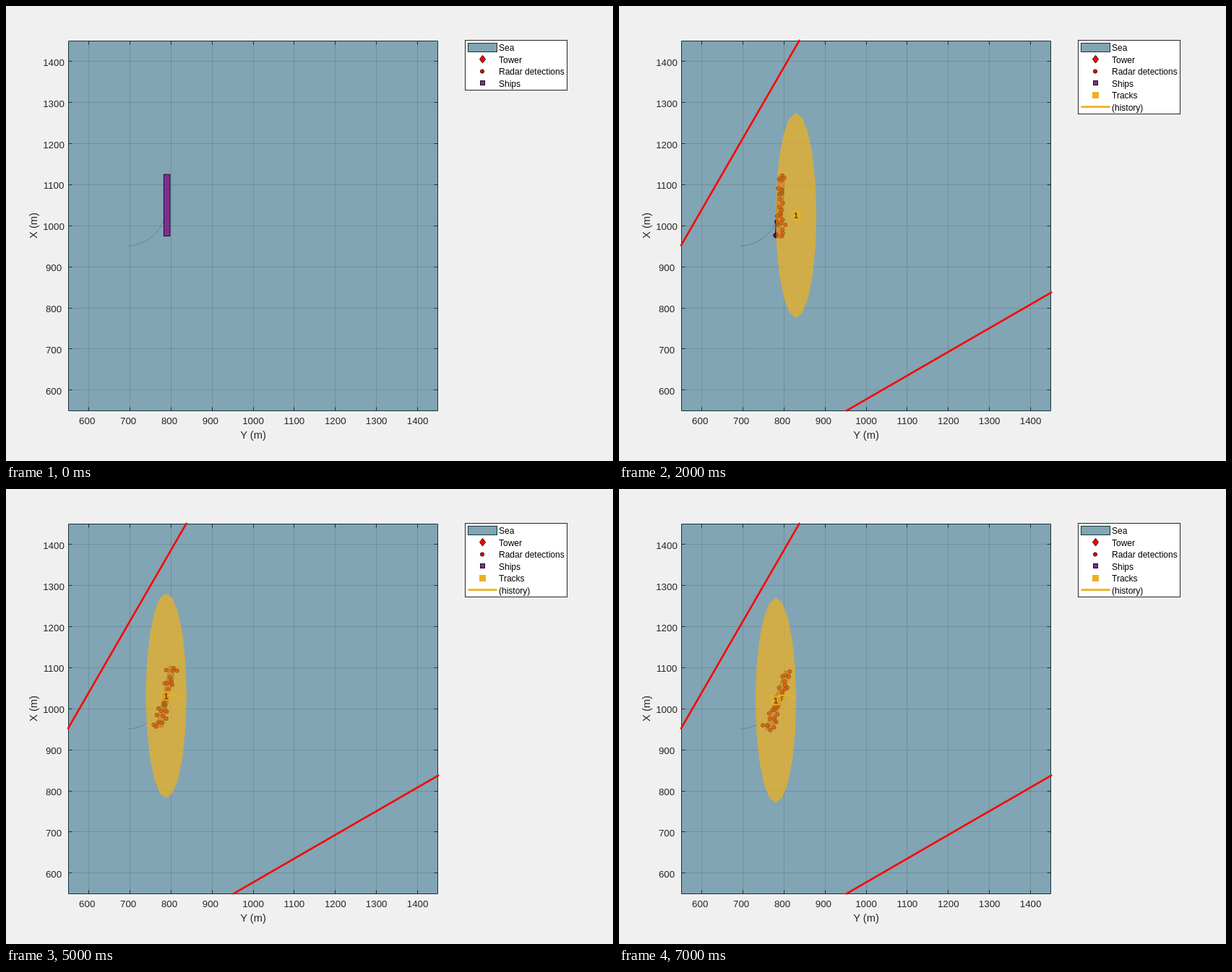
Recreate the animation shown at these times as an HTML page. Size 840 by 630 pixels, loop 8 s.

```html
<!DOCTYPE html>
<html lang="en">
<head>
<meta charset="utf-8">
<title>Radar tracking</title>
<style>
  html, body { margin: 0; width: 100%; height: 100%; overflow: hidden; background: #f0f0f0; }
  svg { display: block; width: 840px; height: 630px; font-family: "Liberation Sans", Arial, sans-serif; }
</style>
</head>
<body>
<svg id="stage" viewBox="0 0 840 630"></svg>
<script>
const NS = "http://www.w3.org/2000/svg";
const stage = document.getElementById("stage");
const SEA = "#81a5b4", INK = "#262626", GOLD = "#edb120", PURPLE = "#7e2f8e", RED = "#f00000";

function add(parent, tag, attrs, text) {
  const el = document.createElementNS(NS, tag);
  for (const k in attrs) el.setAttribute(k, attrs[k]);
  if (text !== undefined) el.textContent = text;
  parent.appendChild(el);
  return el;
}
const path = (parent, d, attrs) => add(parent, "path", { d, fill: "none", ...attrs });
const label = (parent, x, y, size, text, attrs) =>
  add(parent, "text", { x, y, "font-size": size, fill: INK, "text-anchor": "middle", ...attrs }, text);

// Axes: 550 to 1450 m across 512 px
const L = 86.5, T = 48.5, R = 597.5, B = 560.5;
const toX = m => 86 + (m - 550) * 512 / 900;
const toY = m => 560.3 - (m - 550) * 512 / 900;

add(stage, "rect", { width: 840, height: 630, fill: "#f0f0f0" });
add(stage, "rect", { x: L, y: T, width: R - L, height: B - T, fill: SEA });

let grid = "", ticks = "";
for (let m = 600; m <= 1400; m += 100) {
  const x = Math.floor(toX(m)) + 0.5, y = Math.floor(toY(m)) + 0.5;
  grid += `M${x} ${T}V${B}M${L} ${y}H${R}`;
  ticks += `M${x} ${B}v-5M${x} ${T}v5M${L} ${y}h5M${R} ${y}h-5`;
  label(stage, toX(m) - (m < 1000 ? 2.2 : 0), 579, 13.33, m);
  label(stage, 66, toY(m) + 6, 13.33, m);
}
path(stage, grid, { stroke: INK, "stroke-opacity": 0.17 });
path(stage, ticks + `M${L} ${T}H${R}V${B}H${L}Z`, { stroke: "#15323c" });
label(stage, 342, 599, 14.67, "Y (m)");
label(stage, 0, 0, 14.67, "X (m)", { transform: "translate(43 304) rotate(-90)" });

// Course: a quarter circle the ship follows
const TURN = { x: 165.8, y: 275.8, r: 56.9 };
path(stage, `M168.5 332.4A${TURN.r} ${TURN.r} 0 0 0 ${TURN.x + TURN.r} ${TURN.y}`,
  { stroke: "#707b80", "stroke-opacity": 0.85 });

const ship = add(stage, "rect", { x: -4.25, y: -42.65, width: 8.5, height: 85.3, fill: PURPLE, stroke: "#1c1020" });
const beam = path(stage, "M86 331.3L249.5 47.8M314.8 560.3L598.3 396.6",
  { stroke: "#ff0000", "stroke-width": 2.6, "stroke-linecap": "round" });
const hits = path(stage, "", { fill: RED, stroke: "#2a0c0c" });

// Track: uncertainty polygon, history and label
const track = add(stage, "g", {});
const region = path(track, "", { fill: GOLD, "fill-opacity": 0.73 });
const glow = path(track, "", { fill: RED, stroke: "#2a0c0c", opacity: 0.25 });
const trail = path(track, "", { stroke: GOLD, "stroke-width": 2.6, "stroke-opacity": 0.9, "stroke-linejoin": "round" });
const tag = add(track, "g", {});
add(tag, "rect", { x: -7, y: -7, width: 14, height: 14, fill: GOLD, "fill-opacity": 0.7 });
label(tag, 0, 4.2, 11.5, "1", { "font-weight": "bold", fill: "#5e4a14" });

// Legend
const box = add(stage, "rect", { x: 635.5, y: 47.5, width: 141, height: 69, fill: "#fff", stroke: INK });
const entry = (parent, row, text) =>
  label(parent, 682, 62 + row * 16.6, 12, text, { "text-anchor": "start", fill: "#000" });
["Sea", "Tower", "Radar detections", "Ships"].forEach((s, i) => entry(stage, i, s));
add(stage, "rect", { x: 639.5, y: 51.5, width: 40, height: 12, fill: SEA, stroke: "#15323c" });
path(stage, "M659.5 68.3L663.5 73.7L659.5 79.1L655.5 73.7Z", { fill: "#ff0000", stroke: "#2a0c0c" });
add(stage, "circle", { cx: 659, cy: 90.5, r: 2.6, fill: RED, stroke: "#2a0c0c" });
add(stage, "rect", { x: 656.5, y: 103.5, width: 6, height: 6, fill: PURPLE, stroke: "#1c1020" });
const extra = add(stage, "g", {});
add(extra, "rect", { x: 655, y: 119, width: 9, height: 9, fill: GOLD });
path(extra, "M639.5 139.6H679.5", { stroke: GOLD, "stroke-width": 2.6 });
entry(extra, 4, "Tracks");
entry(extra, 5, "(history)");

// Echo points on the hull: across, along
const ECHO = [
  [2, -44], [6, -38], [-6, -36], [1, -37], [-1, -27], [3, -27], [5, -24], [-5, -21], [-1, -17], [4, -17],
  [3, -10], [4, -4], [-2, -4], [0, 1], [3, 5], [1, 9], [-1, 14], [-6, 17], [5, 17], [5, 21], [-5, 20],
  [-5, 25], [7, 27], [4, 30], [5, 35], [-5, 37], [-8, 40], [3, 39], [-4, 40], [1, 13]
];
const CENTERS = [[245, 290], [233.7, 285.1], [225.8, 285.5], [221.7, 286.3], [218.6, 288.5], [217, 292.6]];
const CLUTTER = [530, 478];

function random(seed) {
  return () => {
    seed = (seed * 1664525 + 1013904223) % 4294967296;
    return seed / 4294967296;
  };
}

const dot = (x, y) => `M${(x - 2.6).toFixed(2)} ${y.toFixed(2)}a2.6 2.6 0 1 0 5.2 0a2.6 2.6 0 1 0 -5.2 0Z`;

function scan(k, cx, cy, a) {
  if (k < 1) return "";
  const rnd = random(k * 7919 + 3), spread = k > 1 ? 1 : 0;
  let d = "";
  for (const [u, v] of ECHO) {
    const p = u * (spread ? 0.85 : 1) + (rnd() - 0.5) * 6 * spread;
    const q = Math.max(-44, Math.min(44, v + (rnd() - 0.5) * 7 * spread));
    d += dot(cx + p * Math.cos(a) - q * Math.sin(a), cy + p * Math.sin(a) + q * Math.cos(a));
  }
  return k === 6 ? d + dot(...CLUTTER) : d;
}

function ring([cx, cy]) {
  const pts = [];
  for (let i = 0; i < 20; i++) {
    const a = i * Math.PI / 10;
    pts.push((cx + 28.2 * Math.sin(a)).toFixed(2) + " " + (cy - 142 * Math.cos(a)).toFixed(2));
  }
  return "M" + pts.join("L") + "Z";
}

let shown = -1;
function draw(ms) {
  const k = Math.floor(ms / 1000) % 8;
  if (k === shown) return;
  shown = k;
  const deg = Math.max(0, k - 1) * 3, a = deg * Math.PI / 180;
  const cx = TURN.x + TURN.r * Math.cos(a), cy = TURN.y + TURN.r * Math.sin(a);
  ship.setAttribute("transform", `translate(${cx} ${cy}) rotate(${deg})`);
  beam.style.display = k ? "" : "none";
  const d = scan(k, cx, cy, a);
  hits.setAttribute("d", d);

  const tracked = k > 1;
  track.style.display = extra.style.display = tracked ? "" : "none";
  box.setAttribute("height", tracked ? 102 : 69);
  if (!tracked) return;
  const c = CENTERS[k - 2];
  region.setAttribute("d", ring(c));
  glow.setAttribute("d", d);
  trail.setAttribute("d", "M" + CENTERS.slice(0, k - 1).map(p => p.join(" ")).join("L"));
  tag.setAttribute("transform", `translate(${c[0]} ${c[1]})`);
}

const start = performance.now();
function tick() {
  draw(performance.now() - start);
  requestAnimationFrame(tick);
}
tick();
</script>
</body>
</html>
```
